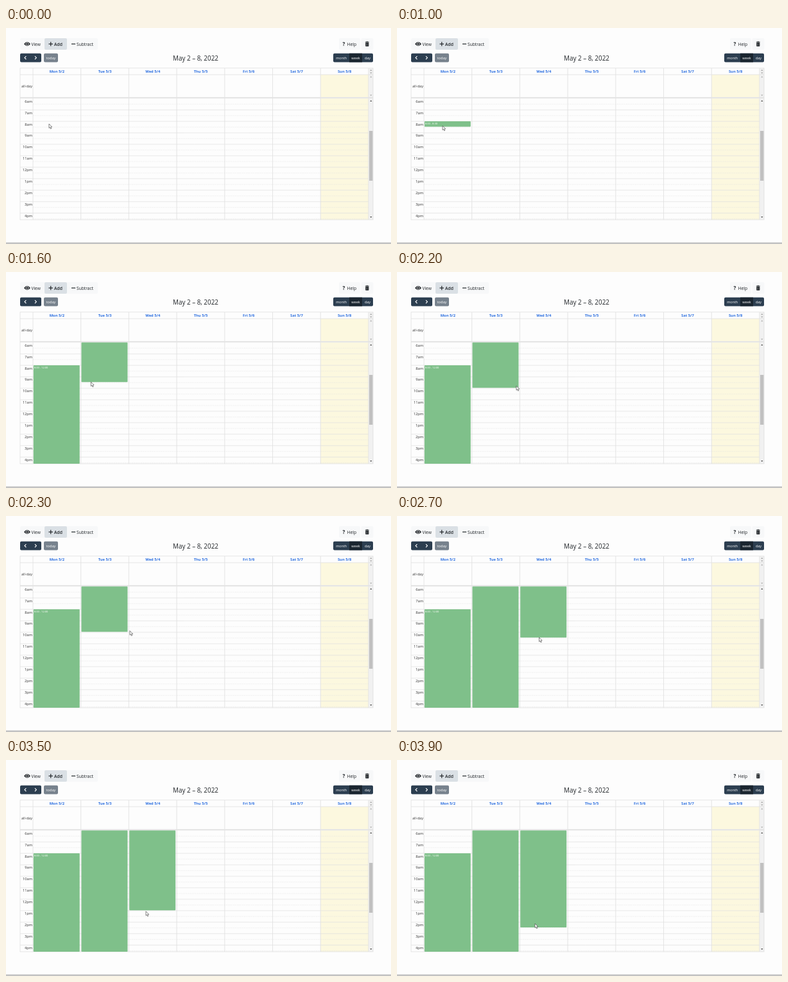
Write an HTML page with a canvas that moves like this. It is 600 px wide and 338 px high and loops after 4 s.

```html
<!DOCTYPE html>
<html lang="en">
<head>
<meta charset="utf-8">
<title>Week calendar</title>
<style>
html, body { margin: 0; width: 100%; height: 100%; overflow: hidden; background: #fdfdfd; }
canvas { display: block; width: 600px; height: 338px; }
</style>
</head>
<body>
<canvas id="stage"></canvas>
<script>
const W = 600, H = 338, LOOP = 4000, STEP = 100;
const canvas = document.getElementById('stage');
const dpr = window.devicePixelRatio || 1;
canvas.width = W * dpr;
canvas.height = H * dpr;
const ctx = canvas.getContext('2d');
ctx.scale(dpr, dpr);

const FONT = '"Open Sans", "Noto Sans", sans-serif';
const LEFT = 42, DAY_W = 74.7, TOP = 110.2, BOTTOM = 300, HOUR = 17.95;
const DAYS = ['Mon', 'Tue', 'Wed', 'Thu', 'Fri', 'Sat', 'Sun'];
const START = 8, PRESS = 800;

// Pointer path: time, x, y
const PATH = [
  [0, 67, 150], [300, 65.3, 148.4], [400, 65.3, 148.4], [500, 65.7, 148.9],
  [600, 65.7, 148.9], [1000, 71, 153], [1200, 88, 160], [1500, 123.5, 171],
  [2200, 186, 178.3], [2400, 200, 181], [2700, 221.5, 190], [3000, 223, 211],
  [3100, 223, 216.5], [3500, 218, 236.8], [3600, 217, 238], [3700, 216, 247],
  [3800, 215.3, 255], [3900, 215, 256], [4000, 215, 256]
];

const dayX = i => LEFT + i * DAY_W;
const hourY = h => TOP + (h - 6) * HOUR;

function pointer(t) {
  const i = Math.max(1, PATH.findIndex(k => k[0] >= t));
  const [t0, x0, y0] = PATH[i - 1], [t1, x1, y1] = PATH[i];
  const f = (t - t0) / (t1 - t0);
  return { x: x0 + (x1 - x0) * f, y: y0 + (y1 - y0) * f };
}

function box(x, y, w, h, fill, r = 0) {
  ctx.fillStyle = fill;
  ctx.beginPath();
  ctx.roundRect(x, y, w, h, r);
  ctx.fill();
}

function text(s, x, y, size, fill, align = 'left', weight = 400) {
  ctx.font = `${weight} ${size}px ${FONT}`;
  ctx.fillStyle = fill;
  ctx.textAlign = align;
  ctx.textBaseline = 'alphabetic';
  ctx.fillText(s, x, y);
}

function stroke(points, color, width = 1, dash = []) {
  ctx.strokeStyle = color;
  ctx.lineWidth = width;
  ctx.setLineDash(dash);
  ctx.beginPath();
  points.forEach(([x, y], i) => i ? ctx.lineTo(x, y) : ctx.moveTo(x, y));
  ctx.stroke();
  ctx.setLineDash([]);
}

function shape(points, fill) {
  ctx.fillStyle = fill;
  ctx.beginPath();
  points.forEach(([x, y]) => ctx.lineTo(x, y));
  ctx.closePath();
  ctx.fill();
}

function arrow(x, y, dir, fill) {
  shape([[x - 1.6, y + dir * 0.9], [x + 1.6, y + dir * 0.9], [x, y - dir * 0.9]], fill);
}

function eye(x, y) {
  ctx.fillStyle = '#212529';
  ctx.beginPath();
  ctx.moveTo(x - 5, y);
  ctx.quadraticCurveTo(x, y - 6.6, x + 5, y);
  ctx.quadraticCurveTo(x, y + 6.6, x - 5, y);
  ctx.fill();
  ctx.strokeStyle = '#f6f7f8';
  ctx.lineWidth = 0.8;
  ctx.beginPath();
  ctx.arc(x, y, 2.1, 0, Math.PI * 2);
  ctx.stroke();
}

function trash(x, y) {
  const ink = '#212529';
  box(x - 3, y - 3.4, 6, 1, ink, 0.3);
  box(x - 1.2, y - 4, 2.4, 1, ink, 0.3);
  box(x - 2.6, y - 2, 5.2, 5.8, ink, 0.7);
  for (const dx of [-1.3, 0, 1.3]) box(x + dx - 0.2, y - 1, 0.4, 3.8, '#8b8d90');
}

function toolbar() {
  const ink = '#212529', light = '#f7f8f9';
  box(22, 16, 121, 18, light, 2);
  box(60, 16, 35, 18, '#dae0e5', 2);
  eye(33, 25);
  text('View', 39.5, 27.6, 6.6, ink);
  stroke([[66.5, 25], [73, 25]], ink, 1.2);
  stroke([[69.75, 21.8], [69.75, 28.2]], ink, 1.2);
  text('Add', 75, 27.6, 6.8, ink, 'left', 600);
  stroke([[102, 25], [108.2, 25]], ink, 1.2);
  text('Subtract', 110, 27.6, 6.7, ink);

  box(519, 16, 33, 18, light, 2);
  text('?', 524.5, 28, 8, ink, 'left', 700);
  text('Help', 531.5, 27.6, 6.8, ink);
  box(553.5, 16, 19, 18, light, 2);
  trash(562.8, 25);

  box(22, 39.7, 33, 13.8, '#2c3e50', 2);
  stroke([[31.4, 44.2], [29, 46.6], [31.4, 49]], '#fff', 1.1);
  stroke([[45, 44.2], [47.4, 46.6], [45, 49]], '#fff', 1.1);
  box(59, 39.7, 22, 13.8, '#77828d', 2);
  text('today', 70, 48.6, 5.7, '#fff', 'center');
  text('May 2 – 8, 2022', 295.5, 50.5, 9.9, ink, 'center');
  box(510, 39.7, 62, 13.8, '#2c3e50', 2);
  box(535, 39.7, 20, 13.8, '#1a252f');
  text('month', 522.7, 48.6, 5.4, '#fff', 'center');
  text('week', 545, 48.6, 5.5, '#fff', 'center');
  text('day', 563.5, 48.6, 5.5, '#fff', 'center');
}

function grid() {
  const line = '#dfdfdf', track = '#f1f1f1', today = '#fcf8df';
  const end = dayX(7);
  box(dayX(6), 73, DAY_W, 35.5, today);
  box(dayX(6), TOP, DAY_W, BOTTOM - TOP, today);

  for (let h = 6; h <= 16; h++) {
    const y = hourY(h), half = y + HOUR / 2;
    if (h > 6) stroke([[22, y], [end, y]], line, 0.7);
    stroke([[LEFT, half], [end, half]], '#dedede', 0.6, [0.7, 0.7]);
    const label = h < 12 ? h + 'am' : (h === 12 ? 12 : h - 12) + 'pm';
    text(label, 41, y + 6.4, 5.7, '#333', 'right');
  }
  text('all-day', 41, 93, 5.6, '#333', 'right');

  DAYS.forEach((d, i) => {
    text(`${d} 5/${i + 2}`, dayX(i) + DAY_W / 2, 69.9, 5.8, '#2c6fe0', 'center', 700);
  });

  // Scrollbars
  box(end + 0.5, 63, 6.7, 46, track);
  box(end + 0.5, TOP, 6.7, BOTTOM - TOP, track);
  box(566, 161, 5.6, 78, '#c1c1c1');
  arrow(568.8, 66, 1, '#a3a3a3');
  arrow(568.8, 70.5, -1, '#a3a3a3');
  arrow(568.8, 76.3, 1, '#a3a3a3');
  arrow(568.8, 105.3, -1, '#a3a3a3');
  arrow(568.8, 114, 1, '#505050');
  arrow(568.8, 296, -1, '#505050');

  for (let i = 0; i <= 7; i++) {
    stroke([[dayX(i), 63], [dayX(i), BOTTOM]], line, 0.8);
  }
  box(22, 108.2, 550, 2, '#e3e3e3');
  stroke([[22, 73], [572, 73]], line, 0.8);
  ctx.strokeStyle = line;
  ctx.lineWidth = 0.8;
  ctx.strokeRect(22, 62.8, 550, BOTTOM - 62.8);
}

const clock = h => `${Math.floor(h)}:${h % 1 ? '30' : '00'}`;

// The selection follows the pointer one step late and snaps to half hours.
function selection(t) {
  if (t < PRESS) return;
  const p = pointer(t - STEP);
  const last = Math.floor((p.x - LEFT) / DAY_W);
  const end = 6 + (Math.floor((p.y - TOP) / (HOUR / 2)) + 1) / 2;
  for (let i = 0; i <= last; i++) {
    const y0 = i ? TOP : hourY(START);
    const y1 = i < last ? BOTTOM : hourY(end) - 0.7;
    box(dayX(i) + 0.8, y0, DAY_W - 2.7, y1 - y0, '#7fc08a', 0.8);
  }
  text(`8:00 - ${last ? '12:00' : clock(end)}`, 43.8, hourY(START) + 4.5, 4, '#fff');
}

function cursor({ x, y }) {
  const outline = [[0, 0], [0, 6.6], [1.5, 5.3], [2.6, 7.8], [3.7, 7.3], [2.7, 4.9], [4.7, 4.8]]
    .map(([dx, dy]) => [x + dx, y + dy]);
  shape(outline, '#fff');
  stroke([...outline, outline[0]], '#444', 0.65);
}

function draw(now) {
  const t = Math.floor((now % LOOP) / STEP) * STEP;
  box(0, 0, W, H, '#fdfdfd');
  toolbar();
  grid();
  selection(t);
  box(0, 335.6, W, 2.4, '#c2c2c2');
  cursor(pointer(t));
}

const begin = performance.now();
function tick() {
  draw(performance.now() - begin);
  requestAnimationFrame(tick);
}
tick();
</script>
</body>
</html>
```
